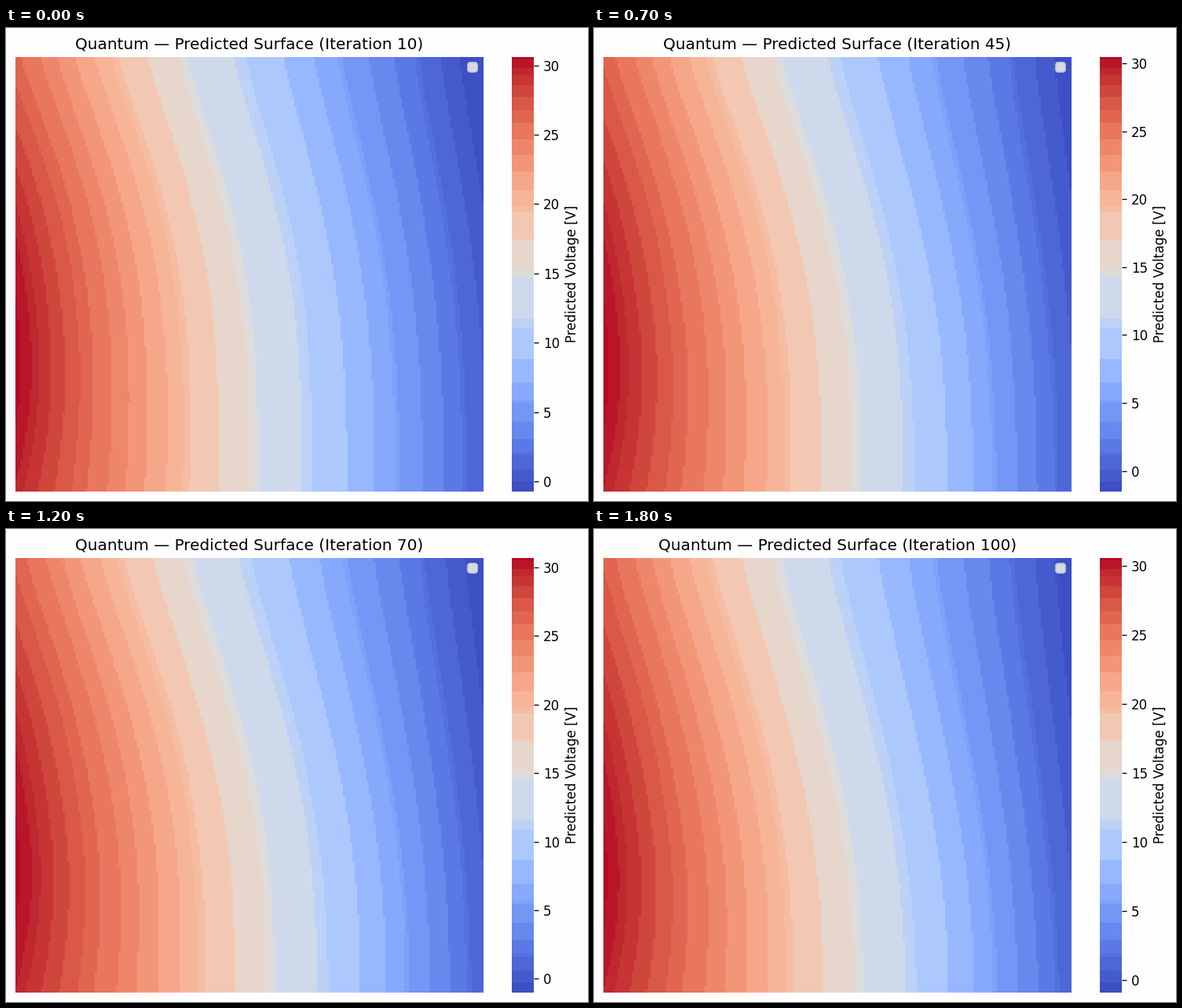
Write a matplotlib script that moves like this. It is 741 px wide and 603 px high and loops after 1.9 s.

```python
import numpy as np
import matplotlib.pyplot as plt
from matplotlib.animation import FuncAnimation
from matplotlib.colors import ListedColormap
from matplotlib.ticker import MultipleLocator

W, H, DPI = 741, 603, 120
LEFT, RIGHT, TOP, BOTTOM = 12, 607.2, 36.6, 591
SPAN = BOTTOM - TOP
BAR_X, BAR_W = 644.4, SPAN / 20
GRID = 200
STEPS = 19

plt.rcParams.update({"font.family": "DejaVu Sans", "font.size": 10})

# Heights where the bar changes colour, in pixels above its foot
BANDS = np.array([12, 28, 45, 50, 67, 89, 113, 117, 139, 169, 208, 221, 273,
                  284, 320, 355, 364, 384, 408, 429, 448, 469, 485, 502, 518,
                  531, 539, 550]) / SPAN

# Voltage range at a few steps
KEYS = [0, 2, 4, 7, 10, 14, 18]
LOWS = [-0.74, -0.02, -0.61, -1.53, -1.03, -1.00, -0.91]
HIGHS = [30.62, 29.93, 30.31, 30.50, 30.78, 30.64, 30.60]

# Contour positions along the top and bottom edges, as curves over the level
KNOTS = [1, 0.736, 0.493, 0.251, 0.121, 0]
TOP_CURVE = np.polyfit(KNOTS, [-80, 96, 238, 401, 500, 607], 4)
BOTTOM_CURVE = np.polyfit(KNOTS, [17, 180, 321, 467, 558, 650], 4)


def banded_map():
    """Coolwarm flattened into bands of one colour each."""
    limits = np.concatenate([[0], BANDS, [1]])
    colors = plt.get_cmap("coolwarm")((limits[:-1] + limits[1:]) / 2)
    shades = (np.arange(256) + 0.5) / 256
    return ListedColormap(colors[np.digitize(shades, BANDS)])


def surface(step):
    """Normalised surface on the grid, row 0 at the top."""
    u = np.linspace(1.05, 0, 80)[:, None]
    s = (np.arange(GRID) + 0.5) / GRID

    # The fit swings at first, then its lower half settles further right
    swing = -8 * np.cos(np.pi * step / 2) * np.exp(-step / 6)
    t = np.clip((step - 3) / 5, 0, 1)
    drift = 21 * t * t * (3 - 2 * t)

    top = np.polyval(TOP_CURVE, u) + swing
    bottom = np.polyval(BOTTOM_CURVE, u) + drift * np.sin(np.pi * u)
    ease = 1 - (1 - s ** 1.25) ** (2.5 + 1.3 * u - 0.05 * step)
    bulge = 30 * u ** 6 * np.clip((s - 0.65) / 0.35, 0, 1) ** 2
    contours = top + (bottom - top) * ease - bulge

    x = LEFT + s * (RIGHT - LEFT)
    return np.array([np.interp(x, row, u[:, 0]) for row in contours.T])


def add_axes(x, width):
    return fig.add_axes([x / W, 1 - BOTTOM / H, width / W, SPAN / H])


fig = plt.figure(figsize=(W / DPI, H / DPI), dpi=DPI, facecolor="#fefefe")
cmap = banded_map()
style = dict(cmap=cmap, vmin=0, vmax=1, aspect="auto", interpolation="nearest")

ax = add_axes(LEFT, RIGHT - LEFT)
ax.axis("off")
heat = ax.imshow(surface(0), **style)
title = ax.set_title("")
ax.legend(handles=[], loc="upper right", fontsize=9, framealpha=1,
          facecolor="#d4dae7")

bar = add_axes(BAR_X, BAR_W)
shades = bar.imshow(np.linspace(0, 1, 256)[:, None], origin="lower", **style)
bar.set_xticks([])
bar.yaxis.tick_right()
bar.yaxis.set_label_position("right")
bar.yaxis.set_major_locator(MultipleLocator(5))
bar.set_ylabel("Predicted Voltage [V]")
bar.spines[:].set_visible(False)


def draw(step):
    low, high = np.interp(step, KEYS, LOWS), np.interp(step, KEYS, HIGHS)
    heat.set_data(surface(step))
    shades.set_extent((0, 1, low, high))
    bar.set_ylim(low, high)
    title.set_text(f"Quantum — Predicted Surface (Iteration {10 + 5 * step})")
    return heat, shades, title


anim = FuncAnimation(fig, draw, frames=STEPS, interval=100, repeat=True,
                     repeat_delay=0, blit=False)
plt.show()
```
